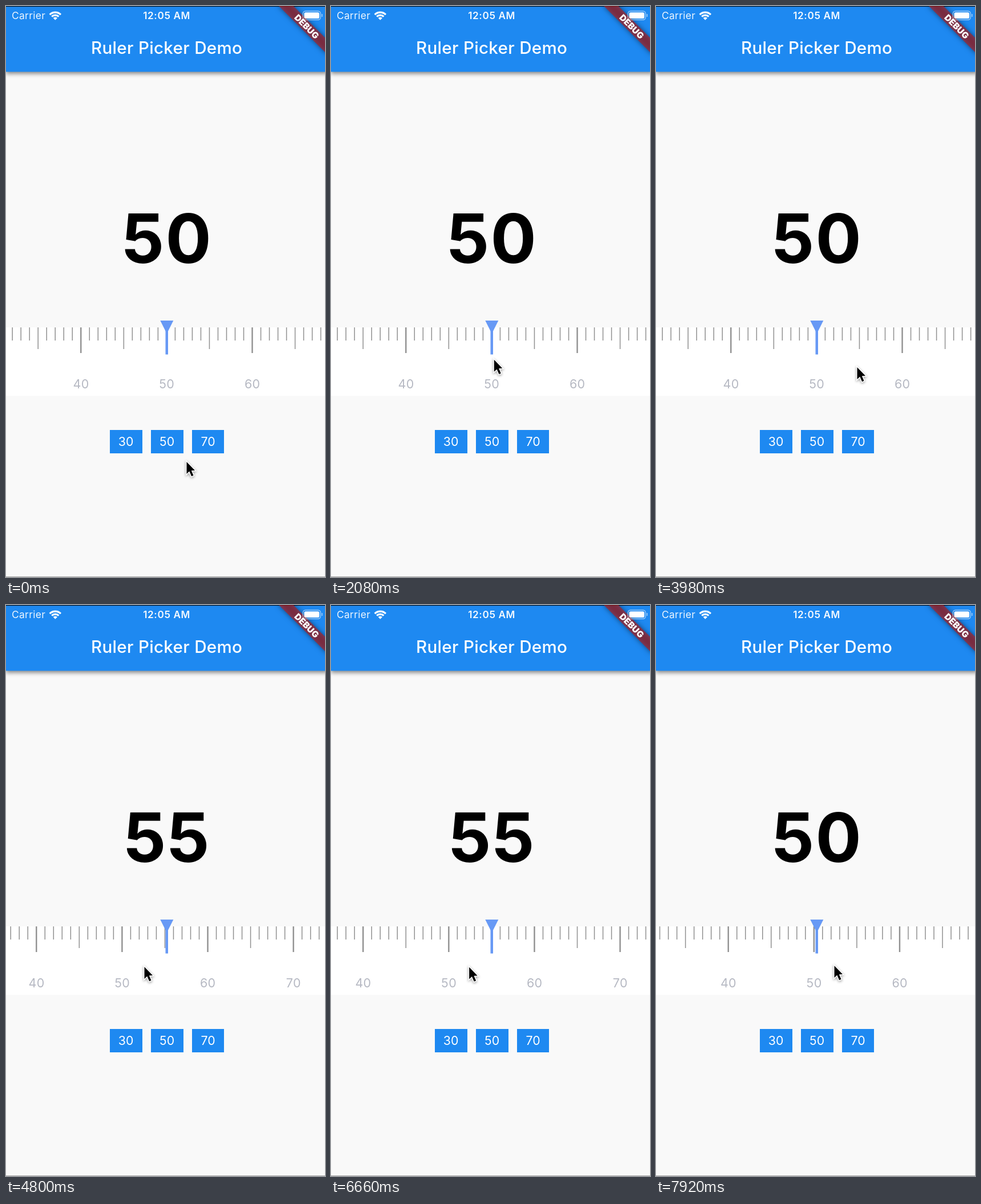
An HTML page with a canvas for the animation above (8000 ms loop, 559 px wide and 1002 px high).

```html
<!DOCTYPE html>
<html lang="en">
<head>
<meta charset="utf-8">
<title>Ruler Picker Demo</title>
<style>
html, body { margin: 0; width: 100%; height: 100%; overflow: hidden; background: #f9f9f9; }
canvas { display: block; }
</style>
</head>
<body>
<canvas id="stage" width="559" height="1002"></canvas>
<script>
const ctx = document.getElementById('stage').getContext('2d');
const W = 559, H = 1002, LOOP = 8000;
const PT = 1.5013;            // pixels per logical point
const MID = 281.6;            // x of the ruler marker
const STEP = 10 * PT;         // distance between ticks
const BLUE = '#1e89f1';

// Pointer tip: time, x, y
const POINTER = [
  [20, 316, 800], [520, 295.5, 631], [780, 295.5, 631], [1240, 281, 619],
  [1340, 281, 619], [1520, 282, 620], [1940, 282, 620], [2780, 326, 631],
  [3440, 326, 631], [3900, 352, 634], [4010, 352, 634], [4800, 242, 635],
  [5080, 242, 635.5], [6640, 242, 635.5], [7040, 197, 636], [7580, 197, 636],
  [7600, 198, 632], [7920, 312, 633]
];

const clamp = (v, lo, hi) => Math.min(hi, Math.max(lo, v));
const smooth = p => p * p * (3 - 2 * p);
const easeOut = p => 1 - (1 - p) ** 3;

function pointerAt(t) {
  if (t <= POINTER[0][0]) return POINTER[0].slice(1);
  for (let i = 1; i < POINTER.length; i++) {
    const [t0, x0, y0] = POINTER[i - 1], [t1, x1, y1] = POINTER[i];
    if (t < t1) {
      const p = smooth((t - t0) / (t1 - t0));
      return [x0 + (x1 - x0) * p, y0 + (y1 - y0) * p];
    }
  }
  return POINTER[POINTER.length - 1].slice(1);
}

// The ruler follows the pointer once the drag passes its slop, then snaps.
function valueAt(t, x) {
  if (t < 4010) return 50;
  if (t < 5080) return 50 + Math.max(0, 320 - x) / STEP;
  if (t < 7600) return 55 + (78 / STEP - 5) * (1 - easeOut(clamp((t - 5080) / 420, 0, 1)));
  return 55 - Math.max(0, x - 241.5) / STEP;
}

function text(str, x, y, size, weight, color, align = 'center', spacing = 0) {
  ctx.font = `${weight} ${size}px Inter, "Noto Sans", sans-serif`;
  ctx.letterSpacing = spacing + 'px';
  ctx.textAlign = align;
  ctx.fillStyle = color;
  ctx.fillText(str, x, y);
}

function rect(x, y, w, h, color) {
  ctx.fillStyle = color;
  ctx.fillRect(x, y, w, h);
}

function poly(points) {
  ctx.beginPath();
  points.forEach(([x, y]) => ctx.lineTo(x, y));
  ctx.closePath();
}

function shadow(color, blur, y = 0) {
  ctx.shadowColor = color;
  ctx.shadowBlur = blur;
  ctx.shadowOffsetY = y;
}

function drawWifi(x, y) {
  const from = -Math.PI * 0.75, to = -Math.PI * 0.25;
  ctx.strokeStyle = ctx.fillStyle = '#fff';
  ctx.lineWidth = 3.2;
  for (const r of [13.6, 8.6]) {
    ctx.beginPath();
    ctx.arc(x, y, r, from, to);
    ctx.stroke();
  }
  ctx.beginPath();
  ctx.moveTo(x, y);
  ctx.arc(x, y, 5.2, from, to);
  ctx.fill();
}

function drawBattery() {
  ctx.strokeStyle = 'rgba(255,255,255,.55)';
  ctx.lineWidth = 1.4;
  ctx.beginPath();
  ctx.roundRect(520.3, 9, 31, 15.2, 4.5);
  ctx.stroke();
  ctx.fillStyle = '#fff';
  ctx.beginPath();
  ctx.roundRect(522.5, 11.2, 26.6, 10.8, 2.6);
  ctx.fill();
  rect(553, 14, 1.6, 5, 'rgba(255,255,255,.55)');
}

function drawBanner() {
  ctx.save();
  ctx.translate(375 * PT, 0);
  ctx.rotate(Math.PI / 4);
  const box = [-40 * PT, 28 * PT, 80 * PT, 12 * PT];
  ctx.save();
  shadow('rgba(0,0,0,.5)', 10);
  ctx.shadowOffsetX = 2000;
  ctx.translate(-2000 * Math.SQRT1_2, 2000 * Math.SQRT1_2);
  rect(...box, '#000');
  ctx.restore();
  rect(...box, 'rgba(183,28,28,.627)');
  text('DEBUG', 0, 34 * PT + 5.5, 15.3, 900, '#fff');
  ctx.restore();
}

function drawHeader() {
  ctx.save();
  shadow('rgba(0,0,0,.45)', 7, 3);
  rect(0, 0, W + 4, 115.5, BLUE);
  ctx.restore();
  rect(0, 0, W, 1.2, '#06121f');
  text('Carrier', 10, 23, 17.4, 400, 'rgba(255,255,255,.92)', 'left', 0.3);
  drawWifi(86.3, 24.8);
  text('12:05 AM', MID, 23, 17.2, 600, 'rgba(255,255,255,.95)', 'center', 0.6);
  text('Ruler Picker Demo', MID, 84, 29.6, 500, '#fff', 'center', 0.3);
  drawBanner();
  drawBattery();
}

function drawRuler(value) {
  rect(0, 564, W, 120, '#fff');
  const reach = Math.ceil(MID / STEP) + 2, base = Math.round(value);
  for (let n = base - reach; n <= base + reach; n++) {
    const x = MID + (n - value) * STEP;
    const major = n % 10 === 0;
    const w = major ? 2.4 : 1.5;
    rect(x - w / 2 - 0.2, 564, w, major ? 45 : n % 5 === 0 ? 38 : 23, '#909090');
    if (major) text(n, x, 671, 21.5, 400, '#b6b9c3', 'center', 0.3);
  }
  ctx.fillStyle = '#6799f5';
  poly([[270.3, 552], [293.3, 552], [281.8, 575]]);
  ctx.fill();
  rect(279.5, 564, 4.5, 47.5, '#6799f5');
}

function drawButtons() {
  [30, 50, 70].forEach((n, i) => {
    const x = 182 + i * 72;
    rect(x, 744, i === 2 ? 56 : 57, 41, BLUE);
    text(n, x + 28.2, 772, 21.3, 400, '#fff', 'center', 0.2);
  });
}

function drawPointer(x, y) {
  ctx.save();
  ctx.translate(x + 0.5, y);
  poly([[0, 0], [0, 21], [4.8, 16.6], [8.6, 25.2], [12, 23.8], [8.3, 15.2], [14.5, 15]]);
  ctx.lineJoin = 'miter';
  ctx.miterLimit = 3;
  ctx.lineWidth = 3;
  ctx.strokeStyle = '#fff';
  shadow('rgba(0,0,0,.4)', 4, 1.5);
  ctx.stroke();
  shadow('transparent', 0);
  ctx.fillStyle = '#000';
  ctx.fill();
  ctx.restore();
}

function draw(t) {
  const [x, y] = pointerAt(t), value = valueAt(t, x);
  rect(0, 0, W, H, '#f9f9f9');
  drawHeader();
  text(Math.round(value), 282.5, 450.5, 119, 700, '#000', 'center', 2);
  drawRuler(value);
  drawButtons();
  rect(0, H - 1, W, 1, '#a5a5a5');
  drawPointer(x, y);
}

const start = performance.now();
function tick() {
  draw((performance.now() - start) % LOOP);
  requestAnimationFrame(tick);
}
tick();
</script>
</body>
</html>
```
